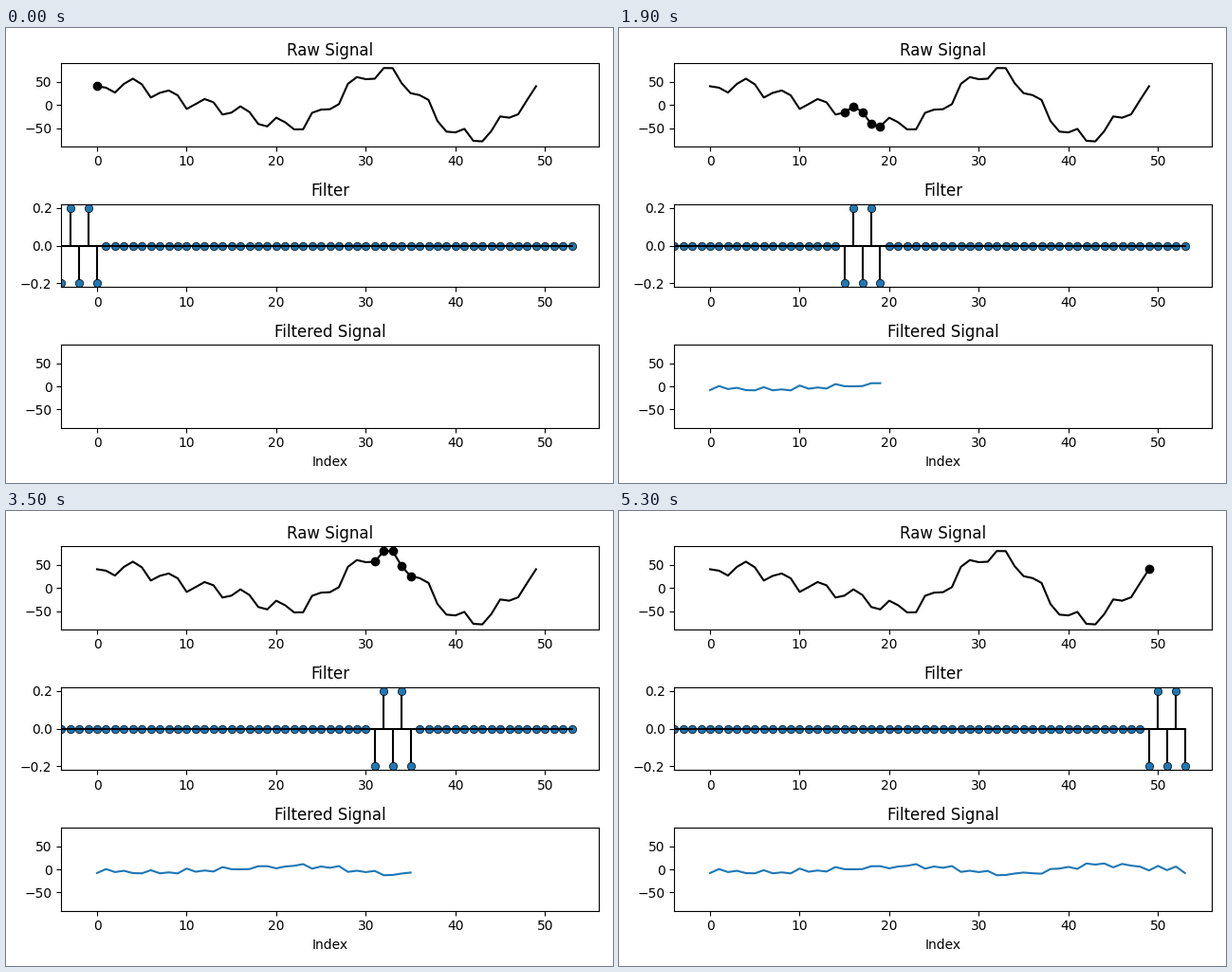
A matplotlib script that plays this animation: 640x480 px, repeating every 5400 ms.

```python
import numpy as np
import matplotlib.pyplot as plt
from matplotlib.animation import FuncAnimation

n, m = 50, 5
steps = n + m - 1

theta = np.linspace(0, 2 * np.pi, n)
signal = (50 * np.sin(2 * theta) + 25 * np.cos(3 * theta)
          + 15 * np.cos(12 * theta) + 3 * np.sin(23 * theta))
kernel = -(-1.0) ** np.arange(m) / m
filtered = np.convolve(signal, kernel)
tap_x = np.arange(1 - m, steps)


def taps(k):
    """Kernel placed so that its last tap sits at index k."""
    values = np.zeros(len(tap_x))
    values[k:k + m] = kernel
    return values


fig, (ax_raw, ax_filter, ax_out) = plt.subplots(3, 1, figsize=(6.4, 4.8), dpi=100)
signal_limit = np.abs(signal).max() + 10
panels = (
    (ax_raw, "Raw Signal", signal_limit, 50),
    (ax_filter, "Filter", 1.1 / m, 0.2),
    (ax_out, "Filtered Signal", signal_limit, 50),
)
for ax, title, limit, tick in panels:
    ax.set_title(title)
    ax.set_xlim(-4, 56)
    ax.set_ylim(-limit, limit)
    ax.set_xticks(range(0, 51, 10))
    ax.set_yticks([-tick, 0, tick])
ax_out.set_xlabel("Index")

ax_raw.plot(signal, "k-")
window, = ax_raw.plot([], [], "ko")
heads, stems, _ = ax_filter.stem(
    tap_x, taps(0), linefmt="k-", markerfmt="C0o", basefmt="k-")
heads.set(markeredgecolor="k", markeredgewidth=0.5)
out_line, = ax_out.plot([], [], "C0-")
fig.tight_layout()


def update(k):
    covered = np.arange(max(0, k - m + 1), min(k, n - 1) + 1)
    window.set_data(covered, signal[covered])

    values = taps(k)
    heads.set_ydata(values)
    stems.set_segments([[(x, 0), (x, y)] for x, y in zip(tap_x, values)])

    out_line.set_data(np.arange(k + 1), filtered[:k + 1])
    return window, heads, stems, out_line


anim = FuncAnimation(fig, update, frames=steps, interval=100,
                     repeat=True, repeat_delay=0)
plt.show()
```
